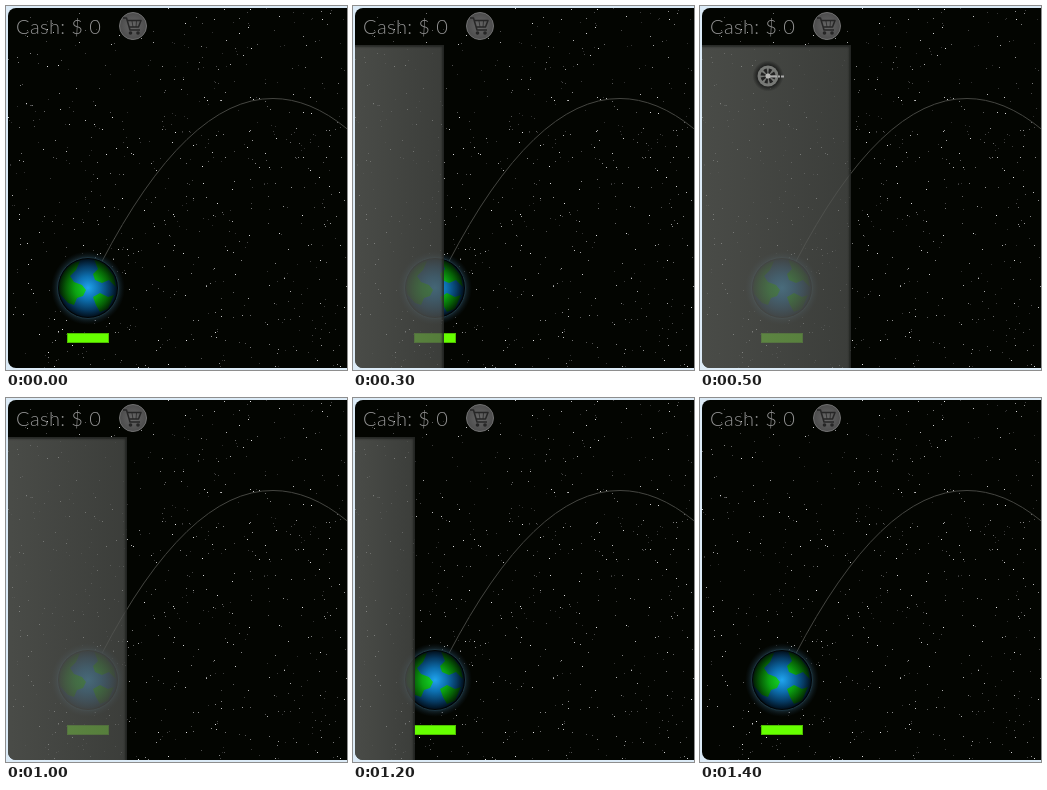
Write an HTML page with a canvas that moves like this. It is 341x364 px and loops after 1900 ms.

```html
<!DOCTYPE html>
<html lang="en">
<head>
<meta charset="utf-8">
<title>Space defence side menu</title>
<style>
  html, body { margin: 0; width: 100%; height: 100%; overflow: hidden; background: #dcebf7; }
  .stage { position: relative; width: 341px; height: 364px; overflow: hidden; }
  .stage > * { position: absolute; left: 0; top: 0; }
  #sky { left: 2px; top: 2px; background: #030501; border-radius: 8px 0 0 8px; }
  .panel {
    left: 2px; top: 39px; height: 323px; width: 0;
    border-radius: 0 0 0 8px;
    background: linear-gradient(90deg, rgba(97, 99, 95, .75), rgba(78, 80, 77, .75));
    box-shadow: inset -2px 2px 2px rgba(15, 17, 15, .55);
    animation: slide 1.9s infinite;
  }
  .turret { animation: reveal 1.9s step-end infinite; }
  .cash { font: 300 20px Lato, sans-serif; letter-spacing: .4px; fill: #929292; }

  @keyframes slide {
    0% { width: 0; animation-timing-function: steps(5, end); }
    26.3157% { width: 149px; animation-timing-function: step-end; }
    47.3684% { width: 149px; animation-timing-function: steps(5, end); }
    73.6842%, 100% { width: 0; }
  }
  @keyframes reveal {
    0% { visibility: hidden; }
    26.3157% { visibility: visible; }
    52.6315%, 100% { visibility: hidden; }
  }
</style>
</head>
<body>
<div class="stage">
  <canvas id="sky" width="339" height="360"></canvas>

  <svg width="341" height="364">
    <defs>
      <radialGradient id="sea">
        <stop offset="0" stop-color="#20a4ee"/>
        <stop offset=".4" stop-color="#0d70b0"/>
        <stop offset=".75" stop-color="#063a62"/>
        <stop offset="1" stop-color="#01101d"/>
      </radialGradient>
      <radialGradient id="land" gradientUnits="userSpaceOnUse" cx="82" cy="282" r="29">
        <stop offset="0" stop-color="#16d82c"/>
        <stop offset=".45" stop-color="#0ca312"/>
        <stop offset=".75" stop-color="#066006"/>
        <stop offset="1" stop-color="#021c04"/>
      </radialGradient>
      <radialGradient id="halo">
        <stop offset=".78" stop-color="#2a4a5c" stop-opacity=".7"/>
        <stop offset="1" stop-color="#10202a" stop-opacity="0"/>
      </radialGradient>
      <radialGradient id="button">
        <stop offset="0" stop-color="#666"/>
        <stop offset="1" stop-color="#4c4c4c"/>
      </radialGradient>
      <clipPath id="globe"><circle cx="82" cy="282" r="29"/></clipPath>
    </defs>

    <path d="M95 256.900Q181 92.900 267 92.500T345 126" fill="none" stroke="none"/>
    <path d="M95 257.200Q181 92 267 92.500Q304 92.500 341 122.800" fill="none" stroke="#454641"/>

    <circle cx="82" cy="282" r="37" fill="url(#halo)"/>
    <circle cx="82" cy="282" r="30.500" fill="#010406" stroke="#1c343f"/>
    <circle cx="82" cy="282" r="29" fill="url(#sea)"/>
    <g clip-path="url(#globe)" fill="url(#land)">
      <path d="M52 280L56 266L65 257L74 255L70 264L64 270L68 276L76 279L80 284L77 290L71 292L68 299L62 297L54 288Z"/>
      <path d="M88 253L98 257L108 270L110 281L103 274L96 277L89 274L87 268L92 263Z"/>
      <path d="M87 291L94 287L102 291L108 289L102 303L94 306L90 299Z"/>
    </g>

    <rect x="61.500" y="327.500" width="41" height="9" fill="#6f0" stroke="#4fc000"/>

    <text class="cash" x="10" y="28">Cash: $ 0</text>

    <circle cx="127" cy="20" r="13.500" fill="url(#button)" stroke="#707070"/>
    <g fill="none" stroke="#262626" stroke-width="1.500" stroke-linejoin="round">
      <path d="M117 12h3.500l3.500 12h10M121 14.500h14l-2.500 6.500h-9.500"/>
      <path d="M126 15l1 6M130.500 15l-.500 6" stroke-width=".8"/>
    </g>
    <g fill="#262626"><circle cx="124.500" cy="27" r="1.800"/><circle cx="132" cy="27" r="1.800"/></g>
  </svg>

  <div class="panel"></div>

  <svg class="turret" width="341" height="364">
    <defs>
      <radialGradient id="shade">
        <stop offset=".65" stop-color="#1c1d1c"/>
        <stop offset="1" stop-color="#1c1d1c" stop-opacity="0"/>
      </radialGradient>
    </defs>
    <circle cx="68" cy="70" r="15.500" fill="url(#shade)"/>
    <circle cx="68" cy="70" r="10.500" fill="#777976"/>
    <circle cx="68" cy="70" r="5" fill="none" stroke="#222" stroke-width="5"
            stroke-dasharray="2.427 1.500"/>
    <circle cx="68" cy="70" r="2.500" fill="#b8b8b6"/>
    <path d="M70 70.500h14" stroke="#aaa" stroke-width="2" stroke-dasharray="7 1 2 1"/>
  </svg>
</div>

<script>
  const sky = document.getElementById('sky').getContext('2d');
  let seed = 20117;
  const random = () => (seed = seed * 16807 % 2147483647) / 2147483647;

  for (let i = 0; i < 720; i++) {
    const x = Math.floor(random() * 339);
    const y = Math.floor(random() * 360);
    const light = Math.round(45 + 190 * random() ** 2.2);
    sky.fillStyle = `rgb(${light}, ${light}, ${light})`;
    sky.fillRect(x, y, 1, 1);
  }
</script>
</body>
</html>
```
